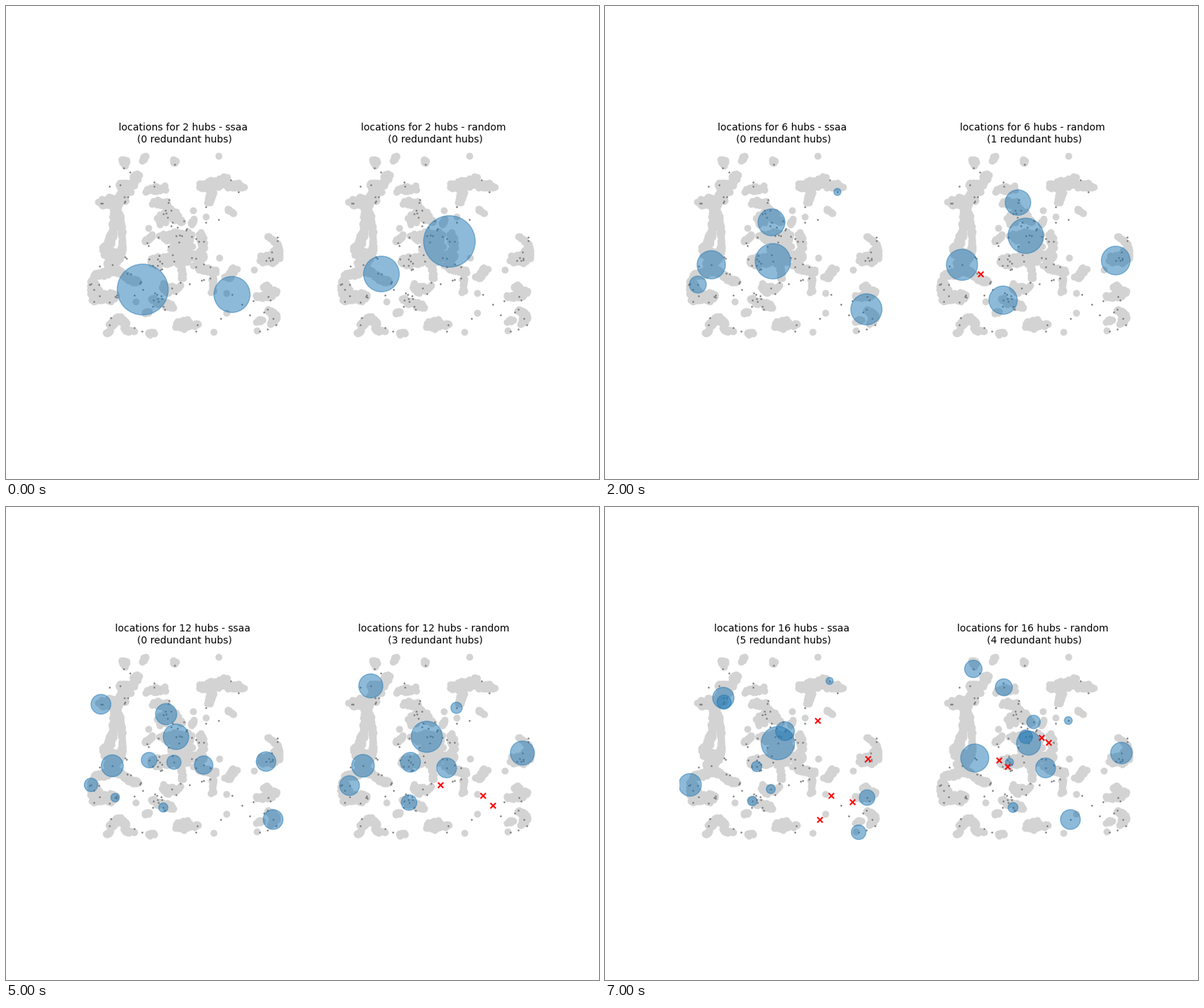
A matplotlib script that plays this animation: 837x669 px, repeating every 8000 ms.

```python
import numpy as np
import matplotlib.pyplot as plt
from matplotlib.animation import FuncAnimation
from matplotlib.patches import Circle

W, H, DPI = 837, 669, 100
X0, X1 = 104.6, 399.5      # left panel, in stage pixels
Y0, Y1 = 200.6, 475.0
SHIFT = 353.9              # distance between the panels

rng = np.random.default_rng(4)

# Settled land: paths that are filled with round patches
NARROW = [
    [(196, 213), (193, 218)], [(238, 217), (238, 222)],
    [(159, 290), (164, 322), (164, 354)], [(141, 463), (147, 459)],
    [(166, 457), (181, 461)], [(265, 302), (261, 308)],
    [(195, 334), (207, 323)], [(246, 365), (249, 386)],
    [(292, 384), (291, 405)], [(195, 433), (202, 432)],
    [(200, 463), (210, 462)], [(265, 452), (271, 448)],
    [(313, 288), (319, 293)], [(370, 325), (385, 339)],
    [(354, 446), (362, 443)],
]
MEDIUM = [
    [(165, 219), (168, 222)], [(185, 238), (178, 252), (158, 253)],
    [(155, 285), (153, 306), (147, 332), (138, 346)],
    [(126, 380), (155, 374), (185, 391)],
    [(146, 452), (158, 442), (170, 447)], [(199, 261), (223, 257)],
    [(210, 278), (229, 279)], [(274, 321), (277, 342)],
    [(267, 367), (295, 377)], [(221, 394), (228, 402), (244, 397)],
    [(205, 414), (236, 426)], [(287, 276), (290, 262)],
    [(313, 254), (334, 254)], [(312, 384), (323, 372)],
    [(354, 412), (380, 406), (364, 396)], [(371, 432), (381, 440), (374, 450)],
]
BROAD = [
    [(174, 255), (162, 275), (134, 276)], [(141, 349), (158, 354), (146, 364)],
    [(124, 390), (126, 415), (152, 410)],
    [(218, 304), (230, 290), (243, 304)],
    [(222, 326), (256, 325), (236, 345), (258, 342)],
    [(206, 361), (252, 358)], [(264, 355), (278, 352)],
    [(242, 453), (256, 450)], [(275, 256), (309, 247)],
    [(361, 359), (382, 356), (382, 346)],
]
ISLETS = [
    (300, 212), (264, 289), (282, 298), (201, 314), (301, 356), (350, 373),
    (311, 406), (311, 434), (293, 461), (183, 418), (354, 459),
]

# Candidate sites by region
NORTH = [
    (166, 229), (161, 253), (167, 270), (168, 276), (134, 279), (209, 255),
    (229, 278), (317, 246), (328, 263), (282, 284), (300, 302), (282, 306),
    (238, 224),
]
CENTRE = [
    (226, 293), (228, 299), (235, 306), (251, 304), (254, 317), (262, 326),
    (215, 327), (240, 325), (248, 325), (244, 334), (272, 333), (202, 358),
    (217, 361), (237, 361), (214, 367), (218, 373), (268, 369), (279, 365),
    (288, 369), (276, 388), (207, 367),
]
WEST = [
    (168, 355), (150, 366), (176, 379), (120, 393), (131, 394), (124, 418),
    (154, 411), (146, 419), (189, 392), (193, 401), (146, 451),
]
SOUTH = [
    (234, 399), (259, 393), (213, 408), (215, 418), (222, 425), (192, 460),
    (220, 414), (208, 416), (270, 451),
]
EAST = [
    (319, 408), (303, 442), (349, 417), (370, 411), (369, 429), (377, 442),
    (358, 460), (367, 360), (375, 348), (371, 356), (333, 422), (383, 332),
]
REGIONS = dict(n=NORTH, c=CENTRE, w=WEST, s=SOUTH, e=EAST)
SITE = {f"{key}{i}": p for key, pts in REGIONS.items()
        for i, p in enumerate(pts)}


def plan(spare="", **hubs):
    """Hub radius by site, and the sites of redundant hubs."""
    return hubs, spare.split()


shared = dict(n4=14, c0=15, c7=18, c13=10, c17=13, w1=15.5, w3=9.5, w6=6,
              s4=6.5, e7=13.8, e5=14)
PLANS = {
    "ssaa": [
        plan(w9=36, e0=25.5),
        plan(n6=17, c8=25, w1=22.7, e4=22),
        plan(w4=12, w1=20, c2=19, c13=25, n8=5, e4=22),
        plan(n8=5, c2=17.7, c13=24.5, w1=18.3, w0=6.3, w4=10.7, s3=6.7, e4=22),
        plan(n4=17, n7=5, c1=14.8, c8=17.8, c10=6.5, c13=11.3, c16=12.3,
             e7=22, w3=15.2, w9=9),
        plan(**shared, c11=11),
        plan("c4", **shared, n9=5.3, c12=6),
        plan("n10 e9 e0 e2 e1", n2=15, n3=10, n7=5, c4=13.3, c9=23.5, c14=7.3,
             w3=16, s0=6.3, s7=6.7, e3=11, e6=10.3),
    ],
    "random": [
        plan(c10=36.4, w2=25.2),
        plan(n2=19.2, n11=26.5, c15=25.5, w5=15.5),
        plan("w2", n6=18, c7=25, s7=20, w1=22, e7=20.3),
        plan("e9 w5 s5", w2=29.3, s6=22.2, e7=22.2, w3=9, w7=5.8),
        plan("c19", n1=17, c6=19.5, c13=17.3, c15=6, c18=13.3, w3=15.2, w8=7,
             s4=5.2, e4=21.8),
        plan("s1 e10 e0", n1=17, c7=22, c12=14, c16=14, s3=11, w4=14, w1=16,
             e8=17, n9=8),
        plan("c20 s1 e0 e8 s5 e6", n1=16.2, c7=22.8, c5=7.5, c11=19, c16=14,
             s2=6, s3=6.5, e5=14.2),
        plan("c5 c10 c11 c14", n0=12.3, n5=12, n10=5.5, c3=9.5, c7=9.5, c9=17,
             w0=19.8, c12=5.7, c16=14, s4=7, e8=15.2, e1=14),
    ],
}


def near(pts, spread):
    return np.array(pts) + rng.normal(0, spread, (len(pts), 2))


def fill(path, width):
    """Patch centres scattered along a path within a half width."""
    parts = []
    for a, b in zip(np.array(path[:-1]), np.array(path[1:])):
        n = 3 + int((np.hypot(*(b - a)) + 2 * width) * (width + 1.5) / 6)
        t = np.linspace(0, 1, n)[:, None]
        r = width * np.sqrt(rng.random(n))
        turn = rng.uniform(0, 2 * np.pi, n)
        wiggle = np.column_stack([r * np.cos(turn), r * np.sin(turn)])
        parts.append(a + t * (b - a) + wiggle)
    return np.vstack(parts)


def dots(ax, pts, diameter, color):
    ax.scatter(*np.array(pts).T, s=(diameter * 72 / DPI) ** 2, color=color,
               linewidths=0)


land = [fill(path, width)
        for paths, width in ((NARROW, 2), (MEDIUM, 4.2), (BROAD, 7))
        for path in paths]
land = np.clip(np.vstack(land + [ISLETS]), (118.5, 212), (386, 465))
sites = np.vstack([list(SITE.values()), near(NORTH[:7], 6),
                   near(CENTRE + WEST + SOUTH, 8), near(EAST[3:], 6)])
sites = np.clip(sites, (118, 216), (383, 460))

fig = plt.figure(figsize=(W / DPI + 1e-6, H / DPI + 1e-6), dpi=DPI,
                 facecolor="white")
panels = {}
for k, method in enumerate(PLANS):
    ax = fig.add_axes([(X0 + k * SHIFT) / W, 1 - Y1 / H,
                       (X1 - X0) / W, (Y1 - Y0) / H])
    ax.axis("off")
    dots(ax, land, 9.8, "lightgray")
    dots(ax, sites, 2.5, "#777777")
    ax.set_xlim(X0, X1)
    ax.set_ylim(Y1, Y0)
    panels[method] = ax

drawn = []


def update(i):
    while drawn:
        drawn.pop().remove()
    for method, ax in panels.items():
        hubs, spare = PLANS[method][i]
        for name, r in hubs.items():
            hub = Circle(SITE[name], r, color="tab:blue", alpha=0.5, lw=1,
                         zorder=3)
            drawn.append(ax.add_patch(hub))
        if spare:
            x, y = zip(*(SITE[name] for name in spare))
            drawn.append(ax.scatter(x, y, s=30, marker="x", color="red",
                                    linewidths=1.5, zorder=4))
        count = len(hubs) + len(spare)
        ax.set_title(f"locations for {count} hubs - {method} \n"
                     f"({len(spare)} redundant hubs)", fontsize=10)
    return drawn


anim = FuncAnimation(fig, update, frames=8, init_func=lambda: update(0),
                     interval=1000, repeat=True, repeat_delay=0, blit=False)
plt.show()
```
